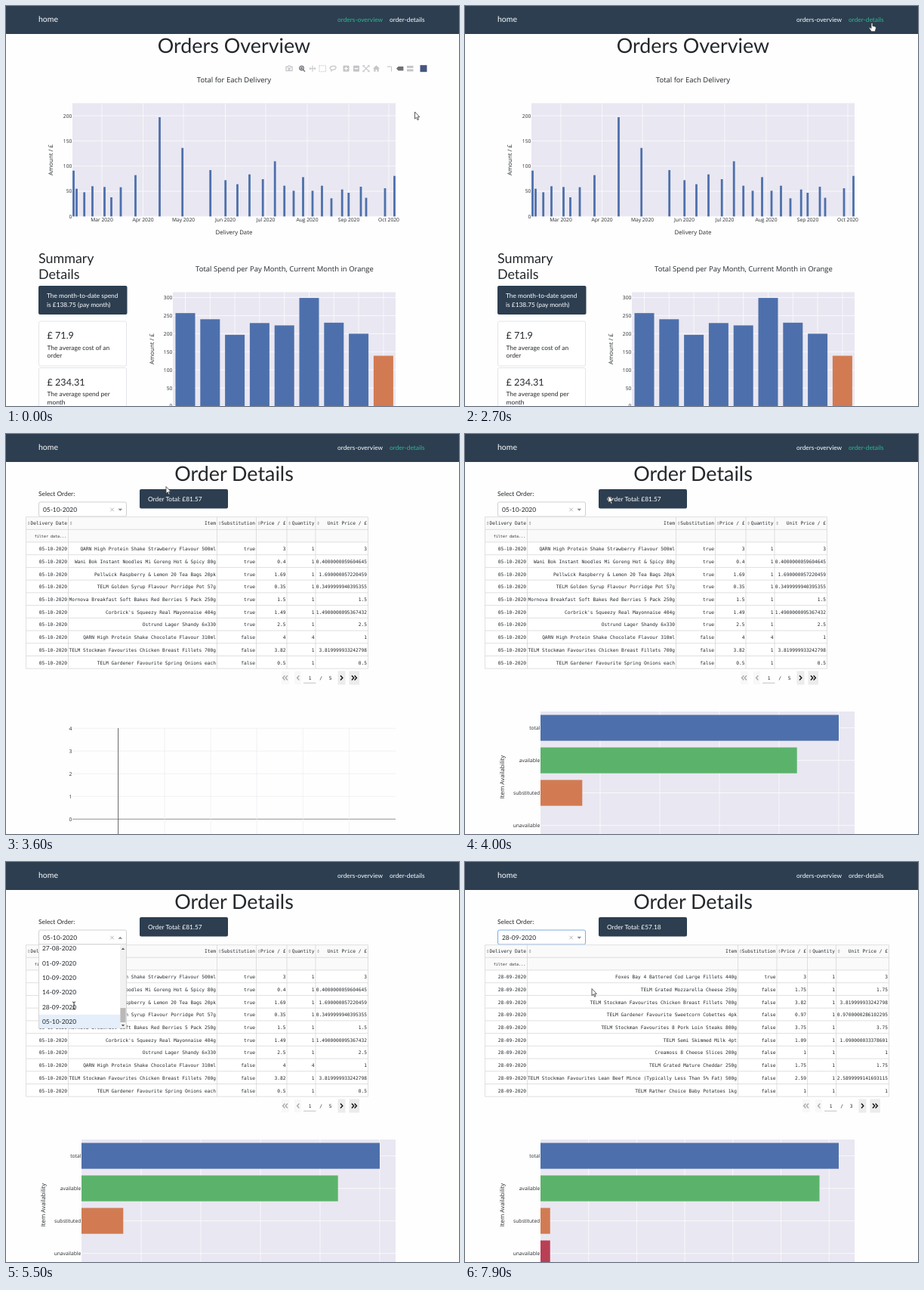
Recreate the animation shown at these times as an HTML page. Size 600x529 px, loop 8 s.

```html
<!DOCTYPE html>
<html lang="en">
<head>
<meta charset="utf-8">
<title>Orders dashboard</title>
<style>
html, body { margin: 0; width: 100%; height: 100%; overflow: hidden; background: #fefefe; }
svg { display: block; width: 600px; height: 529px; text-rendering: geometricPrecision; }
text { fill: #24282c; white-space: pre; }
.ui { font: 8.4px Lato, sans-serif; }
.brand { font: 10.5px Lato, sans-serif; }
.h1 { font: 26.9px Lato, sans-serif; }
.h3 { font: 17.9px Lato, sans-serif; }
.h4 { font: 12.6px Lato, sans-serif; }
.title { font: 9.5px "Open Sans", sans-serif; }
.axis { font: 7.84px "Open Sans", sans-serif; }
.tick { font: 6.7px "Open Sans", sans-serif; }
.cell { font: 6.22px "DejaVu Sans Mono", monospace; }
.hint { font: 5px "DejaVu Sans Mono", monospace; }
.white { fill: #fff; }
</style>
</head>
<body>
<svg id="stage" viewBox="0 0 600 529"></svg>
<script>
const NAVY = '#2c3e50', PLOT = '#e9e7f1', BLUE = '#4d70ac', ORANGE = '#d27b52',
      GREEN = '#5bb36b', RED = '#b93f55', BORDER = '#d3d3d3';

const rect = (x, y, w, h, fill, extra = '') =>
  `<rect x="${x}" y="${y}" width="${w}" height="${h}" fill="${fill}" ${extra}/>`;
const line = (x1, y1, x2, y2, color, width = 0.7) =>
  `<path d="M${x1} ${y1}L${x2} ${y2}" stroke="${color}" stroke-width="${width}"/>`;
const path = (d, fill, extra = '') => `<path d="${d}" fill="${fill}" ${extra}/>`;
const text = (x, y, str, cls, anchor = 'start', extra = '') =>
  `<text x="${x}" y="${y}" class="${cls}" text-anchor="${anchor}" ${extra}>${String(str).replace(/&/g, '&amp;')}</text>`;
const upright = (x, y, str) => text(0, 0, str, 'axis', 'middle', `transform="translate(${x} ${y}) rotate(-90)"`);
const group = (id, body, extra = '') => `<g id="${id}" ${extra}>${body}</g>`;
const range = n => [...Array(n).keys()];

function deliveryChart() {
  const months = ['Mar', 'Apr', 'May', 'Jun', 'Jul', 'Aug', 'Sep', 'Oct'];
  const monthX = [127, 181.5, 235, 290.5, 344, 399, 454, 507];
  const bars = [[89.5, 91], [93.5, 55], [103.7, 48], [114.5, 60], [130.5, 58.5], [139.5, 38], [152, 58],
    [171.5, 82], [203.5, 197], [233.7, 136], [270.7, 92], [290.7, 72], [306.5, 64], [322.5, 83.5],
    [340.2, 74], [356.2, 109.5], [368.7, 61], [381, 51], [393.5, 78], [406, 51], [418.5, 61],
    [431, 36], [445.2, 53.5], [453.8, 47], [470, 59], [477, 37], [502, 56], [514.5, 80.5]];
  let out = text(302, 101, 'Total for Each Delivery', 'title', 'middle') + rect(88, 128.5, 428, 150, PLOT);
  monthX.forEach((x, i) => {
    out += line(x, 128.5, x, 278.5, '#fff') + text(x, 285.3, months[i] + ' 2020', 'tick', 'middle');
  });
  range(5).forEach(i => {
    const y = 278.3 - i * 33.3;
    out += line(88, y, 516, y, '#fff') + text(87.3, y + 2.4, i * 50, 'tick', 'end');
  });
  bars.forEach(([x, v]) => { out += rect(x - 1.4, 278.3 - v * 0.666, 2.8, v * 0.666, BLUE); });
  return out + text(302, 302, 'Delivery Date', 'axis', 'middle') + upright(62, 203.5, 'Amount / £');
}

function monthlyChart() {
  const spend = [257, 240, 197, 229.5, 223, 299, 230.5, 200, 139];
  let out = text(369, 351, 'Total Spend per Pay Month, Current Month in Orange', 'title', 'middle')
    + rect(221, 378.5, 295, 151, PLOT);
  range(7).forEach(i => {
    const y = 529 - i * 23.9;
    out += line(221, y, 516, y, '#fff') + text(220.3, y + 2.4, i * 50, 'tick', 'end');
  });
  spend.forEach((v, i) => {
    const x = 237.5 + i * 32.8, h = v * 0.478;
    out += line(x, 378.5, x, 529, '#fff') + rect(x - 13, 529 - h, 26, h, i === 8 ? ORANGE : BLUE);
  });
  return out + upright(195.5, 453.5, 'Amount / £');
}

function statCard(y, value, first, second) {
  return rect(43.5, y, 116, 59, '#fff', 'rx="2" stroke="#dcdfe4" stroke-width=".8"')
    + text(54.5, y + 23.3, value, 'h4') + text(54.5, y + 37.7, first, 'ui') + text(54.5, y + 48.3, second, 'ui');
}

function overview() {
  return text(302, 62.3, 'Orders Overview', 'h1', 'middle') + deliveryChart() + monthlyChart()
    + text(43, 340.3, 'Summary', 'h3') + text(43, 361.4, 'Details', 'h3')
    + rect(43, 370, 117.5, 38, NAVY, 'rx="2"')
    + text(54, 386, 'The month-to-date spend', 'ui white') + text(54, 397.7, 'is £138.75 (pay month)', 'ui white')
    + statCard(417, '£ 71.9', 'The average cost of an', 'order')
    + statCard(478.5, '£ 234.31', 'The average spend per', 'month');
}

function modebar() {
  const pale = '#c4c5c9', dark = '#6d6f76';
  const icon = (x, d, color = pale, w = 1.3) =>
    `<path transform="translate(${x} 82.7)" d="${d}" fill="none" stroke="${color}" stroke-width="${w}"/>`;
  return icon(375, 'M-4-2.2H-2L-1-3.5H1L2-2.2H4V3H-4ZM-1.2.4a1.2 1.2 0 1 0 2.4 0a1.2 1.2 0 1 0-2.4 0')
    + icon(392, 'M-3.3-.6a2.8 2.8 0 1 0 5.6 0a2.8 2.8 0 1 0-5.6 0M1.5 1.5L4 4M-2-.6H1M-.5-2V1', dark)
    + icon(406, 'M-4 0H4M0-4V4M-4 0l1.4-1.4M-4 0l1.4 1.4M4 0L2.6-1.4M4 0L2.6 1.4', pale, 1.1)
    + `<rect x="415" y="78.8" width="8.5" height="8" fill="none" stroke="${pale}" stroke-dasharray="1.4 1"/>`
    + icon(433, 'M-3 1C-6-2 0-4 3-3C6-1 2 3-2 1.4C-3 2-2 3-2 4')
    + rect(446.5, 78.7, 8, 8, pale, 'rx="1"') + icon(450.5, 'M-2.5 0H2.5M0-2.5V2.5', '#fff')
    + rect(460, 78.7, 8, 8, pale, 'rx="1"') + icon(464, 'M-2.5 0H2.5', '#fff')
    + icon(477, 'M-4-2V-4H-2M2-4H4V-2M4 2V4H2M-2 4H-4V2M-3-3L3 3M3-3L-3 3', pale, 1.1)
    + path('M486 82.8L490.5 78.6L495 82.8H493.7V86.7H491.4V84H489.6V86.7H487.3V82.8Z', pale)
    + icon(508, 'M-3.5-2.5H2.5V4M-1-2.5H0', pale, 1)
    + path('M517 82.7L519.6 80H526.4V85.5H519.6Z', dark)
    + path('M531 79H539.5V82H531ZM531 83.5H539.5V86.5H531Z', pale)
    + rect(548.5, 78.2, 9, 9, '#46557f');
}

function orderTable(date, rows, cols, pages) {
  const heads = ['Delivery Date', 'Item', 'Substitution', 'Price / £', 'Quantity', 'Unit Price / £'];
  const left = 26.5, right = cols[5], step = 16.72, top = 143;
  let out = rect(left, 109.7, right - left, 200.5, '#fff') + rect(left, 109.7, right - left, 33.3, '#fafafa');
  range(13).forEach(i => {
    const y = i < 2 ? 109.7 + i * 16.6 : top + (i - 2) * step;
    out += line(left, y, right, y, BORDER);
  });
  [left, ...cols].forEach(x => { out += line(x, 109.7, x, 310.2, BORDER); });
  heads.forEach((head, i) => {
    const x = (i ? cols[i - 1] : left) + 3.6;
    out += path(`M${x - 1.5} 117.4l1.5-2 1.5 2zM${x - 1.5} 118.4l1.5 2 1.5-2z`, '#a9a9a9')
      + text(cols[i] - 1.4, 120.2, head, 'cell', 'end');
  });
  out += text(80, 136.8, 'filter data...', 'hint', 'end');
  rows.forEach(([item, price, count, unit, swapped], r) => {
    [date, item, !!swapped, price, count, unit].forEach((value, i) => {
      out += text(cols[i] - 1.4, 154.1 + r * step, value, 'cell', 'end');
    });
  });
  return out + pager(right - 479.5, pages);
}

function pager(dx, pages) {
  const arrow = (x, dir, color) =>
    `<path d="M${x - dir * 1.4} 319.6l${dir * 2.8} 2.9l${-dir * 2.8} 2.9" fill="none" stroke="${color}" stroke-width="1.4"/>`;
  return group('', rect(365, 314, 10, 17, '#f8f8f8') + rect(382, 314, 9, 17, '#f8f8f8')
    + rect(439.5, 313.5, 10, 18, '#ececec') + rect(454.5, 313.5, 13.5, 18, '#ececec')
    + arrow(368, -1, '#aaa') + arrow(371.6, -1, '#aaa') + arrow(387, -1, '#aaa')
    + text(402.5, 325.2, 1, 'cell', 'middle') + line(394, 329.3, 410.5, 329.3, '#aaa')
    + text(417, 325.2, '/', 'cell', 'middle') + text(429.7, 325.2, pages, 'cell', 'middle')
    + arrow(444.4, 1, '#111') + arrow(459.3, 1, '#111') + arrow(463, 1, '#111'),
    `transform="translate(${dx})"`);
}

const orderInfo = (date, total) =>
  text(49, 103, date, 'ui') + text(188, 89, 'Order Total: £' + total, 'ui white');

function emptyChart() {
  let out = '';
  range(5).forEach(i => {
    const y = 509.3 - i * 30;
    out += line(88, y, 516, y, i ? '#ececf0' : '#666') + text(87.3, y + 2.4, i, 'tick', 'end')
      + line(210 + i * 61.1, 389, 210 + i * 61.1, 529, '#ececf0');
  });
  return out + line(148.6, 389, 148.6, 529, '#555', 0.9);
}

function availabilityChart(counts, gridStep) {
  const names = ['total', 'available', 'substituted', 'unavailable'];
  const fills = [BLUE, GREEN, ORANGE, RED];
  let out = rect(100, 367, 416, 162, PLOT);
  for (let x = 100 + gridStep; x < 516; x += gridStep) out += line(x, 367, x, 529, '#fff');
  names.forEach((name, i) => {
    const y = 388.6 + i * 43;
    out += line(100, y, 516, y, '#fff') + text(99.3, y + 2.3, name, 'tick', 'end')
      + rect(100, y - 17.1, 395 * counts[i] / counts[0], 34.2, fills[i]);
  });
  return out + upright(52, 453.5, 'Item Availability');
}

function menu() {
  const dates = ['27-08', '01-09', '10-09', '14-09', '28-09', '05-10'];
  const items = rect(44, 0, 107, 19.4, '#e4effb', 'id="highlight"')
    + dates.map((d, i) => text(48, 117.2 + i * 19.4, d + '-2020', 'ui')).join('');
  return '<clipPath id="menuClip"><rect x="43" y="109" width="117" height="110.7"/></clipPath>'
    + rect(43.5, 109, 116, 110.7, '#fff', 'stroke="#ccc" stroke-width=".8"')
    + `<g clip-path="url(#menuClip)">${group('items', items)}</g>`
    + rect(151, 109.5, 8, 110, '#f1f1f1') + rect(151.4, 193, 7.2, 19, '#b9b9b9', 'id="thumb"')
    + path('M152.8 116l2.2-2.6 2.2 2.6z', '#555') + path('M152.8 215l2.2 2.6 2.2-2.6z', '#555');
}

const detailsBase = () =>
  text(302, 62.3, 'Order Details', 'h1', 'middle') + text(43, 82, 'Select Order:', 'ui')
  + rect(177, 73, 117, 25.5, NAVY, 'rx="2"')
  + rect(43.5, 90, 116, 19, '#fff', 'rx="2" stroke="#ccc" stroke-width=".9" id="control"')
  + line(138.3, 97.7, 142.9, 102.3, '#999') + line(142.9, 97.7, 138.3, 102.3, '#999')
  + path('M148.5 98.8h5.6l-2.8 2.9z', '#888', 'id="caretDown"')
  + path('M148.5 101.7h5.6l-2.8-2.9z', '#888', 'id="caretUp"');

const firstOrder = [
  ['QARN High Protein Shake Strawberry Flavour 500ml', 3, 1, 3, 1],
  ['Wani Bok Instant Noodles Mi Goreng Hot & Spicy 80g', 0.4, 1, '0.4000000059604645', 1],
  ['Pellwick Raspberry & Lemon 20 Tea Bags 20pk', 1.69, 1, '1.690000057220459', 1],
  ['TELM Golden Syrup Flavour Porridge Pot 57g', 0.35, 1, '0.3499999940395355', 1],
  ['Mornova Breakfast Soft Bakes Red Berries 5 Pack 250g', 1.5, 1, 1.5, 1],
  ["Corbrick's Squeezy Real Mayonnaise 404g", 1.49, 1, '1.4900000095367432', 1],
  ['Ostrund Lager Shandy 6x330', 2.5, 1, 2.5, 1],
  ['QARN High Protein Shake Chocolate Flavour 310ml', 4, 4, 1],
  ['TELM Stockman Favourites Chicken Breast Fillets 700g', 3.82, 1, '3.819999933242798'],
  ['TELM Gardener Favourite Spring Onions each', 0.5, 1, 0.5]];
const secondOrder = [
  ['Foxes Bay 4 Battered Cod Large Fillets 440g', 3, 1, 3, 1],
  ['TELM Grated Mozzarella Cheese 250g', 1.75, 1, 1.75],
  ['TELM Stockman Favourites Chicken Breast Fillets 700g', 3.82, 1, '3.819999933242798'],
  ['TELM Gardener Favourite Sweetcorn Cobettes 4pk', 0.97, 1, '0.9700000286102295'],
  ['TELM Stockman Favourites 8 Pork Loin Steaks 800g', 3.75, 1, 3.75],
  ['TELM Semi Skimmed Milk 4pt', 1.09, 1, '1.090000033378601'],
  ['Creamoss 8 Cheese Slices 200g', 1, 1, 1],
  ['TELM Grated Mature Cheddar 250g', 1.75, 1, 1.75],
  ['TELM Stockman Favourites Lean Beef Mince (Typically Less Than 5% Fat) 500g', 2.59, 1, '2.5899999141693115'],
  ['TELM Rather Choice Baby Potatoes 1kg', 1, 1, 1]];

const outline = 'stroke="#333" stroke-width=".8" stroke-linejoin="round"';
const pointer = group('arrow', path('M0 0V9.2L2.1 7.3L3.6 10.8L5.1 10.1L3.6 6.8H6.4Z', '#fff', outline))
  + group('hand', path('M-1 .8Q0-.6 1 .8V4.4L4.5 5.2Q5.6 5.6 5.3 7.4L4.3 11.8H-.8L-3.6 7.4Q-3.6 6-2.4 6.4L-1 7.6Z', '#fff', outline))
  + group('beam', '<path d="M-2-5Q0-5 0-3.8Q0-5 2-5M0-4V4M-2 5Q0 5 0 3.8Q0 5 2 5" fill="none" stroke="#222" stroke-width=".9"/>');

document.getElementById('stage').innerHTML =
  rect(0, 0, 600, 37, NAVY) + text(43, 21.2, 'home', 'brand white')
  + text(439, 20.6, 'orders-overview', 'ui', 'start', 'id="overviewLink"')
  + text(508, 20.6, 'order-details', 'ui', 'start', 'id="detailsLink"')
  + group('overview', overview()) + group('modebar', modebar())
  + group('details', detailsBase())
  + group('first', orderInfo('05-10-2020', '81.57')
    + orderTable('05-10-2020', firstOrder, [82.5, 279.5, 331.5, 372, 410, 479.5], 5))
  + group('second', orderInfo('28-09-2020', '57.18')
    + orderTable('28-09-2020', secondOrder, [82.5, 361.5, 413, 453.5, 491.5, 561.5], 3))
  + group('empty', emptyChart())
  + group('firstChart', availabilityChart([50, 43, 7, 0], 79))
  + group('secondChart', availabilityChart([31, 29, 1, 1], 63.7))
  + group('menu', menu()) + rect(48.4, 95.5, 0.7, 9, '#222', 'id="textCaret"')
  + group('cursor', pointer);

const $ = id => document.getElementById(id);

// [start, end, id]: when each part is on the stage
const visible = [
  [0, 2900, 'overview'], [0, 1800, 'modebar'], [2900, 8000, 'details'],
  [2900, 6900, 'first'], [6900, 8000, 'second'],
  [2900, 4000, 'empty'], [4000, 7200, 'firstChart'], [7200, 8000, 'secondChart'],
  [4700, 6800, 'menu'], [4700, 6800, 'caretUp'], [4800, 5300, 'textCaret'],
  [0, 2000, 'arrow'], [2000, 3400, 'hand'], [3400, 4300, 'arrow'],
  [4300, 5300, 'hand'], [5300, 6900, 'beam'], [6900, 8000, 'arrow']];
// [time, x, y] of the cursor hot spot
const track = [[0, 541.5, 140], [100, 541.5, 140], [500, 542, 138.5], [700, 542, 138.5], [1300, 543.3, 136.5],
  [1500, 543.3, 136.5], [2200, 539, 22], [3200, 539, 22], [3300, 520, 24], [3600, 212, 69.5],
  [3700, 212, 69.5], [4400, 156, 100.5], [5000, 156, 100.5], [5500, 90, 190], [6100, 71, 204],
  [7100, 71, 204], [7700, 168, 167.5], [8000, 168, 167.5]];

function cursorAt(t) {
  const i = track.findIndex(([end]) => end > t);
  const [t0, x0, y0] = track[i - 1], [t1, x1, y1] = track[i];
  const k = (t - t0) / (t1 - t0), e = k * k * (3 - 2 * k);
  return [x0 + (x1 - x0) * e, y0 + (y1 - y0) * e];
}

function draw(t) {
  const shown = new Set(visible.filter(([a, b]) => t >= a && t < b).map(v => v[2]));
  visible.forEach(([, , id]) => { $(id).style.display = shown.has(id) ? '' : 'none'; });
  $('caretDown').style.display = shown.has('caretUp') ? 'none' : '';
  $('overviewLink').style.fill = t < 2500 ? '#2fb890' : '#fff';
  $('detailsLink').style.fill = t >= 2000 && t < 4700 ? '#2fb890' : '#fff';
  $('control').setAttribute('stroke', t >= 6800 ? '#6ea3e0' : '#ccc');
  const scrolled = t >= 5700;
  $('items').setAttribute('transform', `translate(0 ${scrolled ? 5.7 : 0})`);
  $('highlight').setAttribute('y', scrolled ? 182.4 : 201.8);
  $('thumb').setAttribute('y', scrolled ? 191.3 : 193);
  $('cursor').setAttribute('transform', `translate(${cursorAt(t)})`);
}

const start = performance.now();
function tick() {
  draw(Math.floor((performance.now() - start) % 8000 / 100) * 100);
  requestAnimationFrame(tick);
}
tick();
</script>
</body>
</html>
```
